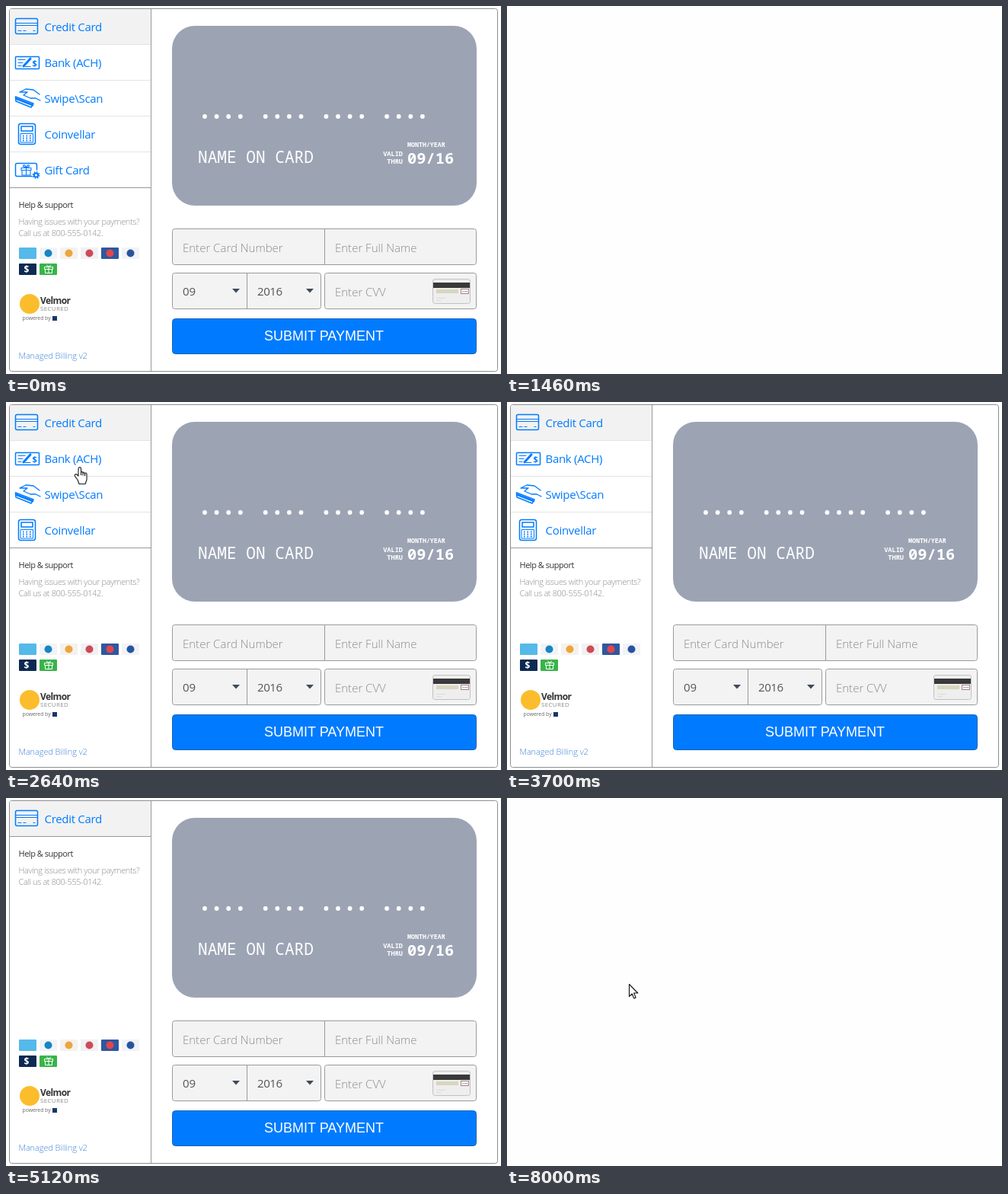
Write an HTML page that moves like this. It is 650 px wide and 483 px high and loops after 8020 ms.

```html
<!DOCTYPE html>
<html lang="en">
<head>
<meta charset="utf-8">
<title>Payment form</title>
<style>
html, body { margin: 0; width: 100%; height: 100%; overflow: hidden; background: #fefefe; }
svg { display: block; width: 650px; height: 483px; }
text { font-family: "Open Sans", "Noto Sans", sans-serif; white-space: pre; }
.line { stroke: #999; fill: none; }
.box { fill: #f3f3f3; stroke: #9a9a9a; }
.nav { font-size: 15px; letter-spacing: -.3px; fill: #007bff; }
.icon { fill: none; stroke: #007bff; stroke-width: 1.5; stroke-linejoin: round; stroke-linecap: round; }
.icon .solid { fill: #007bff; stroke: none; }
.split { stroke: #e2e4e7; }
.small { font-size: 11px; font-weight: 300; letter-spacing: -.38px; fill: #8b8b8b; }
.hint { font-size: 15px; font-weight: 300; fill: #8a8a8a; }
.value { font-size: 15px; fill: #555; }
.card text { font-family: "Noto Sans Mono", "DejaVu Sans Mono", monospace; fill: #fff; }
.card .bold { font-weight: 700; }
.button { font: 18px "Liberation Sans", Arial, sans-serif; fill: #fff; }
.cursor { fill: #fff; stroke: #111; stroke-width: 1.1; stroke-linejoin: round; opacity: 0; }
</style>
</head>
<body>
<svg viewBox="0 0 650 483">
  <g id="page">
    <rect x="4.500" y="3.500" width="641" height="476" rx="3" fill="#fff" stroke="#8f8f8f"/>
    <path d="M5 50.500V6q0-2 2-2H190V50.500Z" fill="#f2f2f2"/>
    <path class="line" d="M190.500 4V479"/>

    <g class="icon">
      <rect x="12.500" y="16.500" width="29" height="20" rx="2"/>
      <path d="M13 22.500H41M13 25.500H41M16 32.500H20M23 32.500H26M36 32.500H38" stroke-width="1.200"/>
    </g>
    <text class="nav" x="50.500" y="33">Credit Card</text>

    <g id="middle">
      <path class="split" d="M5 50.500H190M5 97.500H190M5 144.500H190"/>
      <g class="icon">
        <rect x="12.500" y="66.500" width="31" height="16" rx="1"/>
        <path d="M16 70.500H25M16 74.500H22M16 78.500H20" stroke-width="1.200"/>
        <path d="M23 79L32 69" stroke-width="3"/>
        <path d="M25 79.500H32" stroke-width="1"/>
        <text class="solid" x="34.500" y="79" font-size="11" font-weight="700">$</text>
      </g>
      <text class="nav" x="50.500" y="80">Bank (ACH)</text>

      <g class="icon">
        <path d="M12.500 119L36 128L33 133L13 125Z"/>
        <path d="M13 121.500L35 130" stroke-width="2.500"/>
        <path d="M18 113L26 109L36 110L44 116M18 113L28 113L23 117L32 121L39 121L45 124" stroke-width="1.300"/>
      </g>
      <text class="nav" x="50.500" y="127">Swipe\Scan</text>

      <g class="icon">
        <rect x="16.500" y="154.500" width="22" height="27" rx="3"/>
        <rect x="20" y="158" width="15" height="6"/>
        <path d="M19.500 167.500H35.500V179H19.500Z" stroke-width="1"/>
        <path d="M22 170.500H33M22 173.500H33M22 176.500H33" stroke-width="1.800" stroke-dasharray="1.500 3" stroke-linecap="butt"/>
      </g>
      <text class="nav" x="50.500" y="174">Coinvellar</text>
    </g>

    <g id="last">
      <path class="split" d="M5 191.500H190"/>
      <g class="icon">
        <path d="M34 223.500H14.500q-2 0-2-2V208.500q0-2 2-2H38.500q2 0 2 2V215"/>
        <path d="M20 212.500H33V215.500H20ZM21 215.500V222H32V215.500M26.500 212.500V222M26.500 212Q21 211 23 209Q25 208 26.500 212Q28 208 30 209Q32 211 26.500 212" stroke-width="1.100"/>
        <circle cx="39.500" cy="222" r="2.600" stroke-width="2"/>
        <circle cx="39.500" cy="222" r="4.200" stroke-width="1.500" stroke-dasharray="1.600 1.700" stroke-linecap="butt"/>
      </g>
      <text class="nav" x="50.500" y="221">Gift Card</text>
    </g>

    <g id="help">
      <path class="line" d="M5 .500H190"/>
      <text x="16.500" y="27" font-size="11" letter-spacing="-.48" fill="#333">Help &amp; support</text>
      <text class="small" x="16.500" y="49">Having issues with your payments?</text>
      <text class="small" x="16.500" y="64">Call us at 800-555-0142.</text>
    </g>

    <g id="tiles"></g>
    <text x="23.500" y="350" font-size="12" font-weight="700" fill="#fff">$</text>
    <path d="M50.500 342.500H61.500V345.500H50.500ZM51.500 345.500V350.500H60.500V345.500M56 342.500V350.500M56 342L53 340M56 342L59 340" fill="none" stroke="#fff"/>

    <circle cx="31" cy="391" r="13" fill="#fcbd2c"/>
    <text x="45" y="391" font-size="12" font-weight="700" letter-spacing="-.6" fill="#333">Velmor</text>
    <text x="45" y="400" font-size="8" letter-spacing=".3" fill="#8c8c8c">SECURED</text>
    <text x="21.500" y="412" font-size="6.800" fill="#666">powered by</text>
    <rect x="61" y="407" width="6" height="6" fill="#17366b"/>
    <text class="small" x="16.500" y="463" style="fill:#3f83d6;letter-spacing:-.1px">Managed Billing v2</text>

    <g class="card">
      <rect x="218" y="26" width="400" height="236" rx="30" fill="#9ca4b4"/>
      <g id="dots" fill="#fff"></g>
      <text x="252" y="206" font-size="21.100">NAME ON CARD</text>
      <text class="bold" x="527" y="185" font-size="8.300">MONTH/YEAR</text>
      <text class="bold" x="521" y="197" font-size="8.600" text-anchor="end">VALID</text>
      <text class="bold" x="521" y="207" font-size="8.600" text-anchor="end">THRU</text>
      <text class="bold" x="527" y="207" font-size="20.400">09/16</text>
    </g>

    <rect class="box" x="218.500" y="292.500" width="399" height="47" rx="3"/>
    <rect class="box" x="218.500" y="350.500" width="195" height="47" rx="3"/>
    <rect class="box" x="418.500" y="350.500" width="199" height="47" rx="3"/>
    <path class="line" d="M418.500 293V339M316.500 351V397"/>
    <text class="hint" x="232" y="323">Enter Card Number</text>
    <text class="hint" x="432" y="323">Enter Full Name</text>
    <text class="hint" x="432" y="381">Enter CVV</text>
    <text class="value" x="232" y="380">09</text>
    <text class="value" x="330" y="380" letter-spacing="-.4">2016</text>
    <path d="M297 371H307L302 376.500ZM394 371H404L399 376.500Z" fill="#3f4a59"/>

    <rect x="560.500" y="358.500" width="49" height="32" rx="3" fill="#eee" stroke="#c2c2c2"/>
    <rect x="561" y="363" width="48" height="7" fill="#393939"/>
    <rect x="565" y="372" width="29" height="5" fill="#d8d6bd"/>
    <rect x="597.500" y="371.500" width="10" height="6" fill="#fff" stroke="#a78080"/>
    <path d="M599.500 374.500H606" stroke="#777" stroke-dasharray="1.500 1"/>
    <path d="M565 383.500H577M565 386.500H572" stroke="#ddd"/>

    <rect x="218.500" y="410.500" width="399" height="46" rx="4" fill="#007bff" stroke="#1763b5"/>
    <text class="button" x="417.500" y="439" text-anchor="middle">SUBMIT PAYMENT</text>
  </g>

  <path id="hand" class="cursor" d="M0 .500Q-2 .500-2 3V12L-4 10Q-6 9-7 11Q-7 12-3 17L-1 22.500H7L9 17V9.500Q8 7 6 8.500Q5 6.500 3.500 7.500Q3 6 1.500 6.500V3Q1.500 .500 0 .500ZM1.500 7V11M4 8V11.500M6.500 9V12"/>
  <path id="arrow" class="cursor" d="M.500 .500V16.500L4.200 13L6.800 19L9.200 18L6.600 12H11.800Z"/>
</svg>
<script>
const LOOP = 8020;
const $ = id => document.getElementById(id);

function add(parent, tag, attrs) {
  const el = document.createElementNS("http://www.w3.org/2000/svg", tag);
  for (const name in attrs) el.setAttribute(name, attrs[name]);
  parent.append(el);
}

for (let i = 0; i < 16; i++) {
  add($("dots"), "circle", { cx: 261 + Math.floor(i / 4) * 79.7 + (i % 4) * 15.6, cy: 145, r: 2.9 });
}

// Tile colour and the colour of its plain badge, if any
const tiles = [
  ["#55b9ea"], ["#f1f4f6", "#1685c5"], ["#f4f2ef", "#efa53a"],
  ["#f1f1f3", "#cf4a55"], ["#30579f", "#e2464c"], ["#f2f3f7", "#28549f"],
  ["#0d2a52"], ["#38b449"]
];
tiles.forEach(([fill, badge], i) => {
  const x = 17 + (i % 6) * 27, y = i < 6 ? 317 : 338;
  add($("tiles"), "rect", { x, y, width: 23, height: 15, rx: 1, fill });
  if (badge) add($("tiles"), "circle", { cx: x + 11.5, cy: y + 7.5, r: 5, fill: badge });
});

// Keys are [time in ms, value]; the last value is held to the end of the loop
function play(id, prop, keys, easing = "step-end") {
  const frames = [...keys, [LOOP, keys.at(-1)[1]]]
    .map(([time, value]) => ({ offset: time / LOOP, [prop]: value, easing }));
  $(id).animate(frames, { duration: LOOP, iterations: Infinity });
}
const shift = (x, y) => `translate(${x}px, ${y}px)`;
const path = points => points.map(([time, x, y]) => [time, shift(x, y)]);

play("page", "opacity", [[0, 1], [1460, 0], [1600, 1], [4900, 0], [5120, 1], [7640, 0]]);
play("middle", "opacity", [[0, 1], [4900, 0]]);
play("last", "opacity", [[0, 1], [1460, 0]]);
play("help", "transform", path([[0, 0, 238], [1460, 0, 191], [4900, 0, 50]]));

play("hand", "opacity", [[0, 0], [2440, 1], [3100, 0]]);
play("hand", "transform", path([
  [0, 50, -24], [2440, 50, -24], [2560, 82, 52], [2640, 97, 85], [2740, 102, 94],
  [2860, 97, 84], [2980, 72, 32], [3080, 50, -24]
]), "linear");

play("arrow", "opacity", [[0, 0], [7800, 1]]);
play("arrow", "transform", path([
  [0, 92, 40], [7800, 92, 40], [7880, 124, 140], [7940, 148, 212], [8000, 160, 244]
]), "linear");
</script>
</body>
</html>
```
